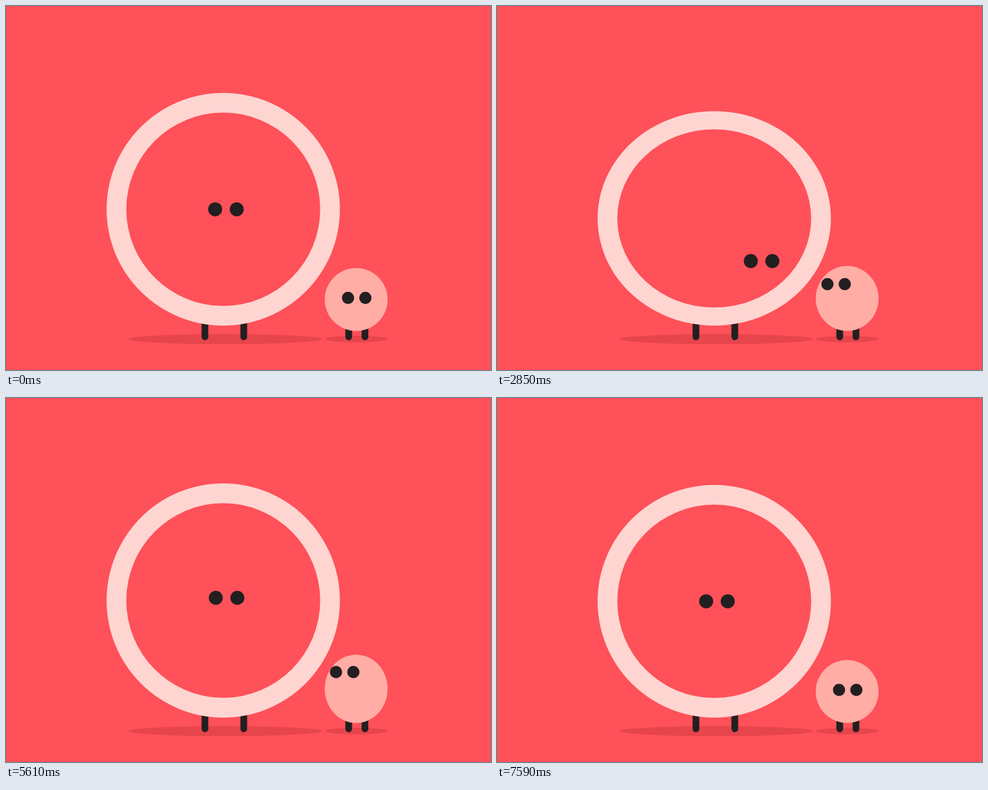
Animation of 864 by 648 pixels, one loop 7.92 s. Source, as an HTML page with a canvas:

```html
<!DOCTYPE html>
<html lang="en">
<head>
<meta charset="utf-8">
<title>Big ring, small ball</title>
<style>
  html, body { margin: 0; width: 100%; height: 100%; overflow: hidden; background: #ff5159; }
  canvas { display: block; width: 864px; height: 648px; }
</style>
</head>
<body>
<canvas id="stage" width="864" height="648"></canvas>
<script>
const ctx = document.getElementById('stage').getContext('2d');
const LOOP = 7920, STEP = 30, TAU = Math.PI * 2;
const BG = '#ff5159', SHADE = '#e6454b', RING = '#ffd5d1', BALL = '#ffada5', INK = '#231f20';

const mix = (a, b, k) => a + (b - a) * k;
const part = (t, from, span) => Math.min(1, Math.max(0, (t - from) / span));
const move = (t, from, span) => {
  const u = part(t, from, span);
  return u * u * (3 - 2 * u);
};
const during = (t, from, till, span, back = span) => move(t, from, span) - move(t, till, back);
const arc = u => 4 * u * (1 - u);
// Repeated rise and fall, 0 at both ends.
const bounce = (t, from, span, count) => (1 - Math.cos(part(t, from, span) * count * TAU)) / 2;

function oval(x, y, rx, ry, color) {
  ctx.fillStyle = color;
  ctx.beginPath();
  ctx.ellipse(x, y, rx, ry, 0, 0, TAU);
  ctx.fill();
}

function legs(x, gap) {
  ctx.strokeStyle = INK;
  ctx.lineWidth = 12;
  ctx.lineCap = 'round';
  ctx.beginPath();
  for (const side of [-0.5, 0.5]) {
    ctx.moveTo(x + side * gap, 552);
    ctx.lineTo(x + side * gap, 589);
  }
  ctx.stroke();
}

// The lower edge of the eye lifts into an arch as smile goes from 0 to 1.
function eye(x, y, r, smile = 0) {
  if (!smile) return oval(x, y, r, r, INK);
  const endX = r - 0.4 * smile, endY = y + 2.4 * smile;
  const pullX = mix(r, 4, smile), pullY = y + mix(r * 4 / 3, -7.6, smile);
  ctx.fillStyle = INK;
  ctx.beginPath();
  ctx.arc(x, y, r, Math.PI, TAU);
  ctx.lineTo(x + endX, endY);
  ctx.bezierCurveTo(x + pullX, pullY, x - pullX, pullY, x - endX, endY);
  ctx.fill();
}

function drawBig(t) {
  const base = 569, cx = 387;
  const squash = during(t, 930, 4440, 168, 240);
  const look = during(t, 930, 4440, 330, 240);
  const grow = during(t, 5580, 7140, 187, 450);
  const lift = during(t, 5580, 7140, 100, 450);
  const smile = during(t, 5640, 6390, 120, 150);
  const nod = bounce(t, 3240, 780, 2), laugh = bounce(t, 5767, 623, 4);

  const ry = 207.1 + (41 * grow - 32.4 * squash + 17 * nod - 8 * laugh) / 2;
  const cy = base - ry;
  legs(389, 69.2);
  ctx.fillStyle = RING;
  ctx.beginPath();
  ctx.ellipse(cx, cy, 207.8, ry, 0, 0, TAU);
  ctx.ellipse(cx, cy, 172.7, ry * 0.831, 0, 0, TAU);
  ctx.fill('evenodd');

  // The eyes swing along a slight curve on the way.
  const glance = arc(part(t, 930, 330)), hop = arc(part(t, 5580, 100));
  const x = 372.6 + 79.5 * look + 0.5 * lift + 1.3 * glance + 1.2 * hop;
  const y = cy + 76 * look - 22 * lift + 5 * glance;
  eye(x, y, 12.5, smile);
  eye(x + 38.4 - 3 * glance, y + 1.8 * glance, 12.5, smile);
}

function drawSmall(t) {
  const base = 578.5;
  const awake = during(t, 390, 6540, 180);         // looks up at the ring
  const stretch = during(t, 1680, 2280, 90);       // first remark
  const answer = during(t, 2820, 6540, 90, 180);   // second remark
  const tall = during(t, 4770, 6540, 90, 180);     // follows the ring upwards

  const ry = 56 + (3.3 * awake + 4.2 * stretch + 1.7 * answer + 4.5 * tall) / 2;
  const x = 609.3 - 20 * awake - stretch - 2.6 * answer + 1.2 * tall;
  const y = 519.6 - 23.2 * awake - 6.5 * stretch - 5 * answer - 3.5 * tall;
  legs(625, 28.9);
  oval(623.8, base - ry, 56, ry, BALL);
  eye(x, y, 10.8);
  eye(x + 30.9, y, 10.8);
}

function draw(now) {
  const t = Math.floor((now % LOOP) / STEP) * STEP;
  ctx.fillStyle = BG;
  ctx.fillRect(0, 0, 864, 648);
  oval(390.5, 593, 172.5, 9, SHADE);
  oval(624, 592.8, 56, 5.8, SHADE);
  drawBig(t);
  drawSmall(t);
}

function loop() {
  draw(performance.now());
  requestAnimationFrame(loop);
}
loop();
</script>
</body>
</html>
```
